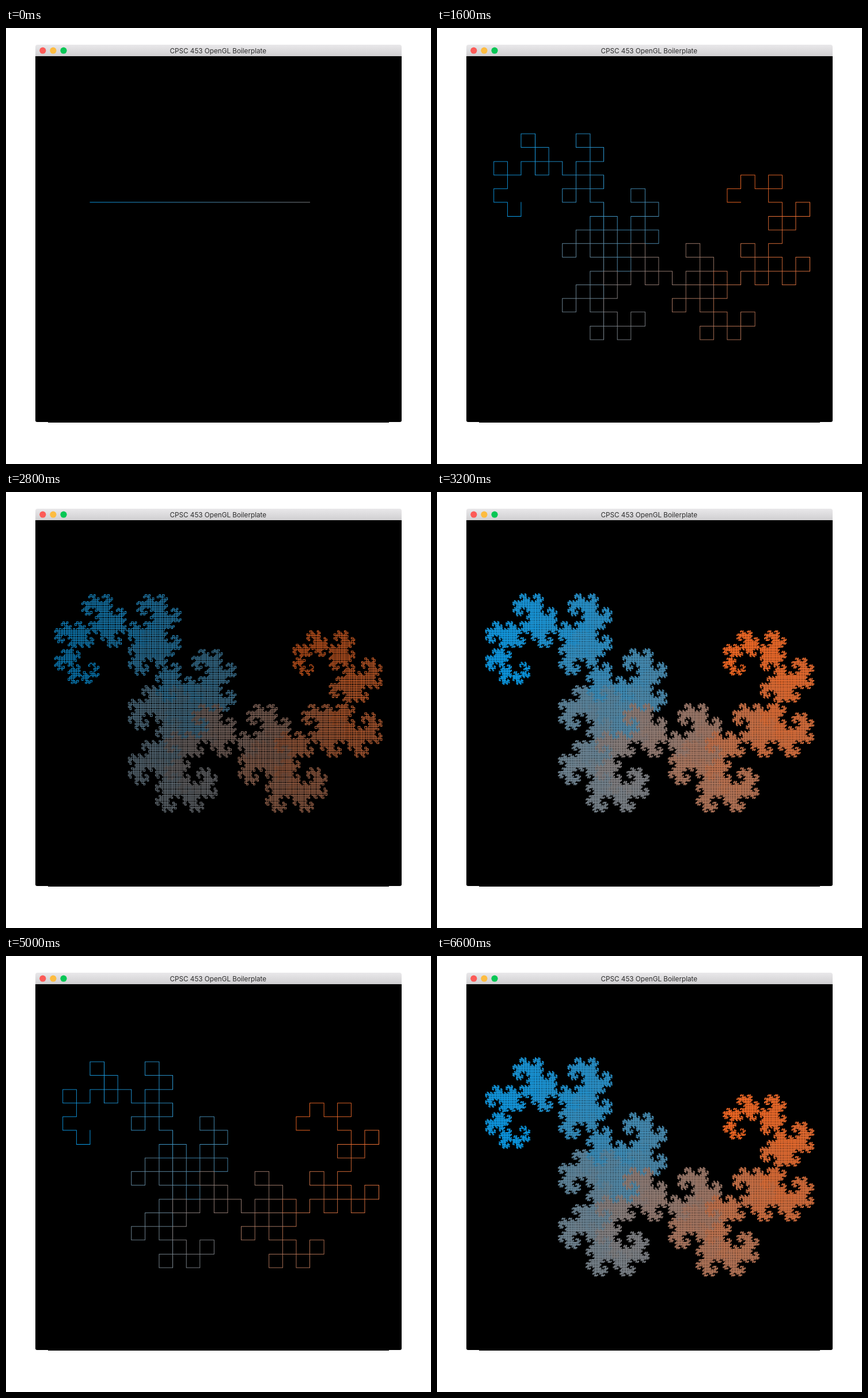
Animation, 738 px wide and 758 px high, one loop 6800 ms. Source, as an HTML page with a canvas:

```html
<!DOCTYPE html>
<html lang="en">
<head>
<meta charset="utf-8">
<title>Dragon curve</title>
<style>
  html, body { margin: 0; width: 100%; height: 100%; overflow: hidden; background: #fff; }
  canvas { display: block; }
</style>
</head>
<body>
<canvas id="stage" width="738" height="758"></canvas>
<script>
const ctx = document.getElementById('stage').getContext('2d');
const STEP_MS = 200, LEVELS = 17;
const LEFT = 51, TOP = 49, SIZE = 636;
const GRID = 700, ROWS = 660; // the curve is rasterised on a finer grid, then scaled down
const SCALE = SIZE / GRID;
const BLACK = 0xff000000;
const BLUE = [10, 160, 240], ORANGE = [255, 108, 36];

const buffer = document.createElement('canvas');
buffer.width = GRID;
buffer.height = ROWS;
const bufferCtx = buffer.getContext('2d');
const plot = bufferCtx.createImageData(GRID, ROWS);
const pixels = new Uint32Array(plot.data.buffer);

function mix(t) {
  const [r, g, b] = BLUE.map((c, i) => Math.round(c + (ORANGE[i] - c) * t));
  return (BLACK | b << 16 | g << 8 | r) >>> 0;
}

// Aliased line; pixels already taken by a later part of the curve stay.
function line(x0, y0, x1, y1, t0, t1) {
  x0 = Math.floor(x0); y0 = Math.floor(y0);
  const dx = Math.floor(x1) - x0, dy = Math.floor(y1) - y0;
  const steps = Math.max(Math.abs(dx), Math.abs(dy), 1);
  for (let s = 0; s <= steps; s++) {
    const f = s / steps;
    const at = Math.round(y0 + dy * f) * GRID + Math.round(x0 + dx * f);
    if (pixels[at] === BLACK) pixels[at] = mix(t0 + (t1 - t0) * f);
  }
}

// Walks the curve from its orange end back to the blue one.
function drawDragon(level) {
  const count = 2 ** level;
  const length = 0.6 * GRID / Math.sqrt(count);
  let heading = 4 - level; // in eighths of a turn
  let x = 0.75 * GRID - 0.01, y = 0.4 * GRID - 0.01;
  pixels.fill(BLACK);
  for (let i = 1; i <= count; i++) {
    const angle = heading * Math.PI / 4;
    const nx = x + length * Math.cos(angle), ny = y + length * Math.sin(angle);
    line(x, y, nx, ny, (count - i + 1) / (count + 1), (count - i) / (count + 1));
    x = nx;
    y = ny;
    heading += i & ((i & -i) << 1) ? -2 : 2;
  }
  bufferCtx.putImageData(plot, 0, 0);
  ctx.drawImage(buffer, LEFT, TOP, SIZE, ROWS * SCALE);
}

function drawWindow() {
  const bar = ctx.createLinearGradient(0, 29, 0, TOP);
  bar.addColorStop(0, '#e9e8ea');
  bar.addColorStop(1, '#d0cfd1');
  ctx.fillStyle = bar;
  ctx.beginPath();
  ctx.roundRect(LEFT, 29, SIZE, 20, [4, 4, 0, 0]);
  ctx.fill();

  ['#fc5b57', '#fdbc40', '#06c755'].forEach((color, i) => {
    ctx.fillStyle = color;
    ctx.beginPath();
    ctx.arc(63.8 + 18.1 * i, 39.2, 5.6, 0, 2 * Math.PI);
    ctx.fill();
  });

  ctx.fillStyle = '#2c2c2c';
  ctx.font = '11.7px Inter, sans-serif';
  ctx.textAlign = 'center';
  ctx.fillText('CPSC 453 OpenGL Boilerplate', 368.3, 43.8);

  ctx.fillStyle = '#000';
  ctx.beginPath();
  ctx.roundRect(LEFT, TOP, SIZE, SIZE, [0, 0, 3, 3]);
  ctx.fill();
  ctx.fillRect(73, 685, 592, 1);
}

let shown = -1;
const start = performance.now();
function tick() {
  const level = Math.floor((performance.now() - start) / STEP_MS) % LEVELS;
  if (level !== shown) drawDragon(shown = level);
  requestAnimationFrame(tick);
}

drawWindow();
tick();
</script>
</body>
</html>
```
